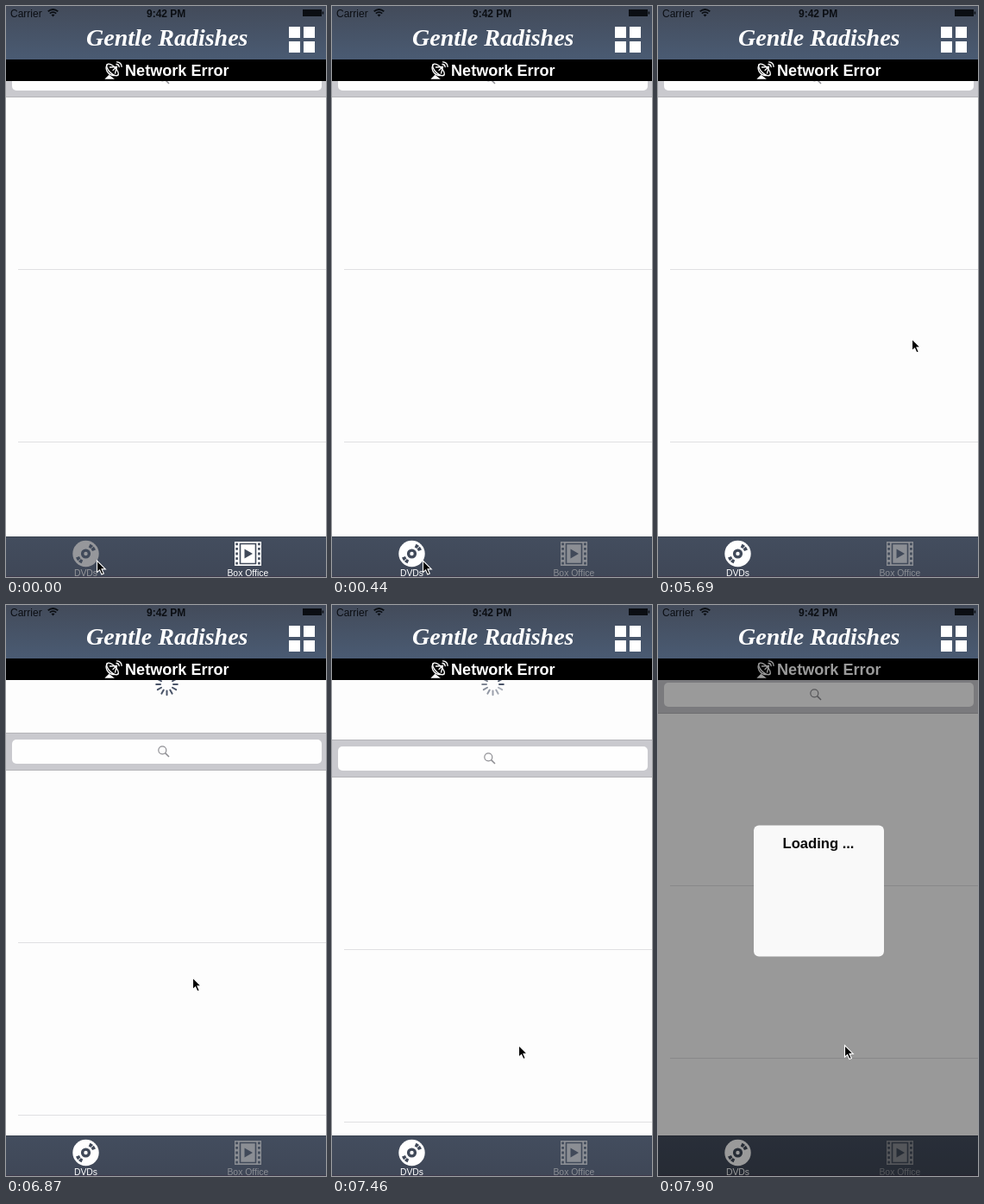
Animation of 371 by 662 pixels, one loop 8 s. Source, as an HTML page:

```html
<!DOCTYPE html>
<html lang="en">
<head>
<meta charset="utf-8">
<title>Pull to refresh</title>
<style>
  html, body { margin: 0; width: 100%; height: 100%; overflow: hidden; background: #fdfdfd; }
  svg { display: block; width: 100vw; height: 100vh; font-family: "Liberation Sans", Arial, sans-serif; }
  .bold { font-weight: bold; }
  .title { font: italic bold 28px "Liberation Serif", serif; }
</style>
</head>
<body>
<svg viewBox="0 0 371 662">
  <defs>
    <linearGradient id="navFill" x1="0" y1="0" x2="0" y2="1">
      <stop offset="0" stop-color="#434b5a"/>
      <stop offset="1" stop-color="#4a5b73"/>
    </linearGradient>
    <linearGradient id="tabFill" x1="0" y1="0" x2="0" y2="1">
      <stop offset="0" stop-color="#434d5e"/>
      <stop offset="1" stop-color="#3f4757"/>
    </linearGradient>
  </defs>

  <rect width="371" height="662" fill="#fdfdfd"/>
  <g id="spinner" stroke="#4a5468" stroke-width="2" stroke-linecap="round"></g>

  <g id="list">
    <rect y="62" width="371" height="600" fill="#fdfdfd"/>
    <rect y="62" width="371" height="44" fill="#c9c9ce"/>
    <path d="M0 62.5H371M0 105.5H371" stroke="#b4b4b8"/>
    <rect x="7" y="70" width="359" height="28" rx="5" fill="#fefefe"/>
    <g fill="none" stroke="#8e8e93" stroke-width="1.2">
      <circle cx="181.3" cy="82.3" r="4.5"/>
      <path d="M184.6 85.6L189 90" stroke-width="1.5"/>
    </g>
    <path d="M14 305.5H371M14 505.5H371" stroke="#e0e0e2"/>
  </g>

  <!-- Navigation bar -->
  <rect width="371" height="62" fill="url(#navFill)"/>
  <g fill="#0b0e13" font-size="12">
    <text x="5" y="12.5">Carrier</text>
    <text x="163" y="12.5" class="bold">9:42 PM</text>
    <path d="M344 4h22v8h-22zM366.6 6.5h1.6v3h-1.6z"/>
    <path d="M54.5 12.5l-2-2.2q2-1.6 4 0z"/>
    <path d="M50.8 8.6q3.7-3 7.4 0M48.7 6.3q5.8-4.6 11.6 0" fill="none" stroke="#0b0e13" stroke-width="1.8"/>
  </g>
  <text x="93" y="46" class="title" fill="#fff">Gentle Radishes</text>
  <path d="M328 24h13v13h-13zM345 24h13v13h-13zM328 41h13v13h-13zM345 41h13v13h-13z" fill="#fff"/>

  <!-- Error banner -->
  <rect y="62" width="371" height="25" fill="#000"/>
  <text x="138" y="80.5" class="bold" font-size="18.1" fill="#fff">Network Error</text>
  <g fill="none" stroke="#fff" stroke-width="1.3" stroke-linecap="round">
    <ellipse cx="123.5" cy="74" rx="8.8" ry="4" transform="rotate(45 123.5 74)"/>
    <path d="M117 68C114 75 120 83 130 80M120.5 71L128.5 70.5 126.5 78M124 74.5L128.5 70.5"/>
    <path d="M128 67.5q3 .2 3.2 3.2M128.5 64.8q5.3.3 5.6 5.6"/>
    <path d="M116 84l3.5-3.5 4.5 3.5z" fill="#fff"/>
  </g>

  <!-- Tab bar -->
  <rect y="615" width="371" height="47" fill="url(#tabFill)"/>
  <path d="M0 615.5H371" stroke="#39414f"/>
  <path d="M0 661.5H371" stroke="#3f3a4c"/>
  <g font-size="10.4" text-anchor="middle">
    <g id="discTab">
      <circle cx="92.5" cy="635" r="15.2"/>
      <circle cx="92.5" cy="635" r="3.9" fill="none" stroke="#414a5a" stroke-width="3.4"/>
      <path d="M96.6 625.6A10.2 10.2 0 0 1 102 631.2M88.4 644.4A10.2 10.2 0 0 1 83 638.8"
        fill="none" stroke="#414a5a" stroke-width="4.2" stroke-dasharray="3.6 .8"/>
      <text x="92.5" y="661">DVDs</text>
    </g>
    <g id="filmTab">
      <rect x="265" y="621" width="31" height="28"/>
      <path d="M267.6 621V649M293.4 621V649" stroke="#414a5a" stroke-width="2.6" stroke-dasharray="2.8 2.8" stroke-dashoffset="-1.4"/>
      <path d="M271.5 623.5h18v23h-18z" fill="none" stroke="#414a5a" stroke-width="1.6"/>
      <path d="M276.5 629.5l9.5 5.5-9.5 5.5z" fill="#414a5a"/>
      <text x="280.3" y="661">Box Office</text>
    </g>
  </g>

  <rect id="dim" y="62" width="371" height="600"/>
  <g id="popup">
    <rect x="111" y="255.5" width="151" height="152" rx="6" fill="#f9f9f9"/>
    <text id="loading" x="144.5" y="282" class="bold" font-size="16.6">Loading ...</text>
  </g>

  <path id="cursor" d="M0 0V13.6L3.1 10.8 5.4 16 7.8 15 5.5 9.9H9.8z" fill="#000" stroke="#fff" stroke-width="1.1"/>
</svg>

<script>
const LOOP = 8000;
const PETALS = 12;
const $ = id => document.getElementById(id);

// [start ms, cursor x, cursor y], no position = hidden
const cursorSteps = [
  [0, 105.5, 643], [890, 141, 601], [1040, 340, 356], [1190, 350, 341], [1340],
  [5690, 294.5, 386], [5830, 256, 330], [5980, 249, 311], [6130, 246, 303],
  [6430, 224, 250], [6580, 216.5, 228], [6720, 216.5, 300], [6870, 216.5, 432],
  [7020, 216.5, 464], [7170, 216.5, 497], [7310, 216.5, 510.5]
];
// [start ms, list pull distance]
const pullSteps = [
  [0, 0], [6720, 34], [6870, 86], [7020, 101], [7170, 112], [7310, 115],
  [7460, 94], [7610, 70], [7750, 42], [7900, 20]
];
// [start ms, dim opacity, label colour]
const dimSteps = [[0, 0], [290, .24, '#3a3a3a'], [440, 0], [7900, .395, '#0a0a0a']];
// [start ms, petal phase]: no phase = evenly dark, negative = hidden
const spinSteps = [[0, -1], [6870], [7310, 1], [7460, 3], [7610, 5], [7750, 7], [7900, -1]];

const stepAt = (steps, t) => steps.findLast(step => step[0] <= t).slice(1);
const show = (el, visible) => el.setAttribute('visibility', visible ? 'visible' : 'hidden');

const petals = Array.from({ length: PETALS }, (_, i) => {
  const petal = document.createElementNS('http://www.w3.org/2000/svg', 'path');
  petal.setAttribute('d', 'M0 -7.5V-12.3');
  petal.setAttribute('transform', `translate(186.5 92) rotate(${i * 360 / PETALS})`);
  return $('spinner').appendChild(petal);
});

function draw(t) {
  const [x, y] = stepAt(cursorSteps, t);
  show($('cursor'), x !== undefined);
  if (x !== undefined) $('cursor').setAttribute('transform', `translate(${x} ${y})`);

  $('list').setAttribute('transform', `translate(0 ${stepAt(pullSteps, t)[0]})`);

  const [phase] = stepAt(spinSteps, t);
  show($('spinner'), !(phase < 0));
  petals.forEach((petal, i) => {
    const age = (phase - i + PETALS) % PETALS;
    petal.setAttribute('opacity', phase === undefined ? 1 : 1 - .6 * age / PETALS);
  });

  const [dim, label] = stepAt(dimSteps, t);
  $('dim').setAttribute('opacity', dim);
  show($('popup'), dim > 0);
  $('loading').setAttribute('fill', label || '#000');

  const discSelected = t >= 290;
  $('discTab').setAttribute('fill', discSelected ? '#fff' : '#96979b');
  $('filmTab').setAttribute('fill', discSelected ? '#8b8e94' : '#fff');
}

const start = performance.now();
function tick() {
  draw((performance.now() - start) % LOOP);
  requestAnimationFrame(tick);
}
draw(0);
requestAnimationFrame(tick);
</script>
</body>
</html>
```
